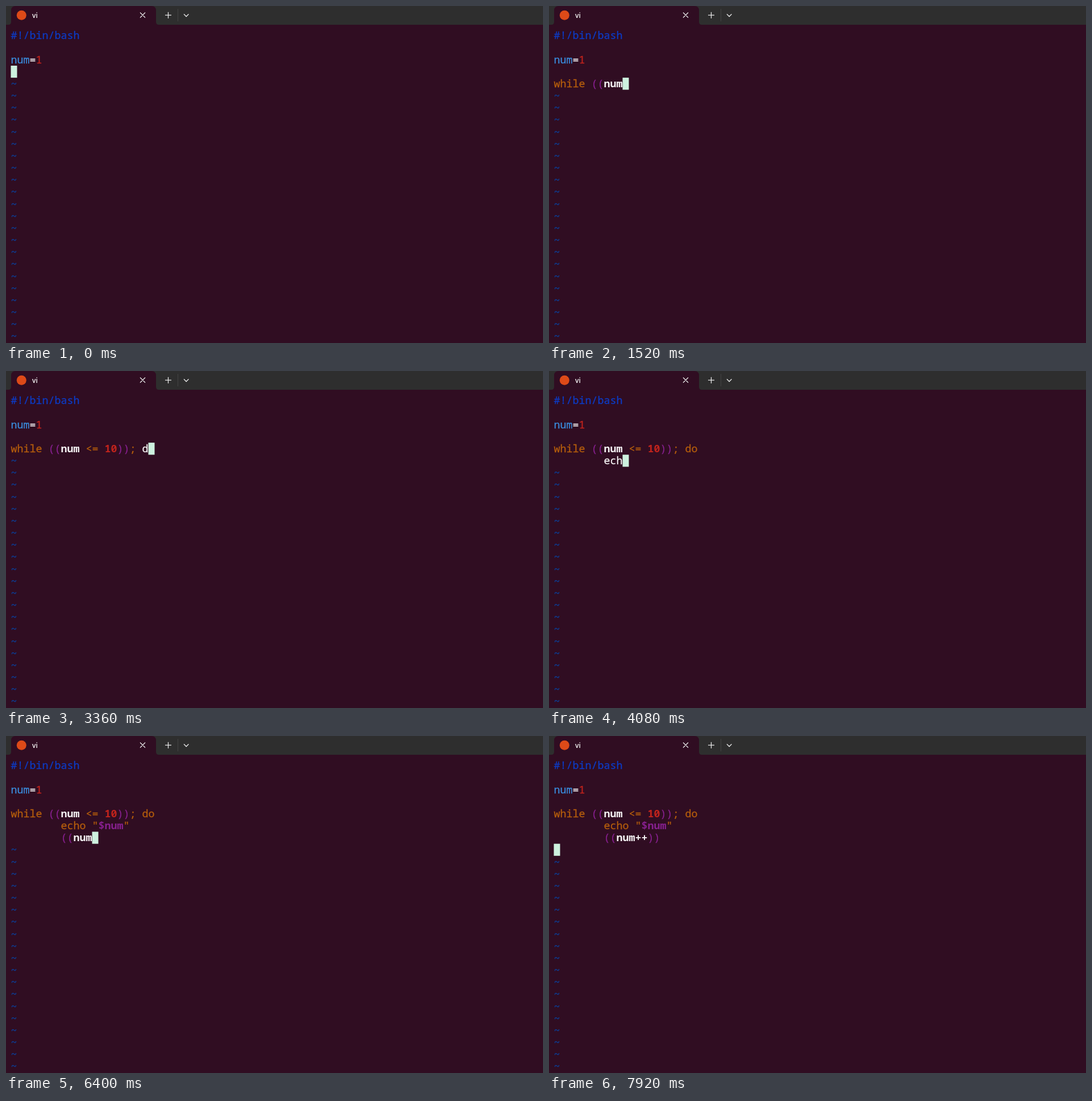
An HTML page that plays this animation: 945x593 px, repeating every 8 s.

```html
<!DOCTYPE html>
<html lang="en">
<head>
<meta charset="utf-8">
<title>Shell script in vi</title>
<style>
  html, body { margin: 0; width: 100%; height: 100%; overflow: hidden; background: #300d22; }
  svg { display: block; width: 945px; height: 593px; }
  .code text { font: 500 18.33px "Noto Sans Mono", "DejaVu Sans Mono", monospace; fill: currentColor; stroke: currentColor; stroke-width: .3px; }
  .code .strong { font-weight: 700; stroke-width: 0; }
  .tab { font: 600 12px "Open Sans", "Noto Sans", sans-serif; fill: #f4f4f4; }
  .icon { fill: none; stroke: #e8e8e8; stroke-width: 1.3; }
</style>
</head>
<body>
<svg viewBox="0 0 945 593">
  <rect width="945" height="593" fill="#300d22"/>
  <rect width="945" height="33" fill="#2e2e2e"/>
  <path d="M4 33Q9 33 9 28V8Q9 0 17 0H256Q264 0 264 8V28Q264 33 269 33Z" fill="#300d22"/>
  <circle cx="27.3" cy="16.2" r="8.5" fill="#dd4a18"/>
  <text class="tab" x="46" y="20.5">vi</text>
  <path class="icon" d="M236 11.5l9 9m0-9l-9 9M280 16.2h11m-5.5-5.5v11M313 14.3l4.2 4.2 4.2-4.2"/>
  <path d="M302.5 5V27" stroke="#444"/>
  <g class="code" id="fixed"></g>
  <g class="code" id="tildes"></g>
  <g class="code" id="typed"></g>
  <rect id="cursor" width="11" height="21.2" fill="#cdf1df"/>
</svg>
<script>
const LOOP = 8000, LEFT = 8.5, TOP = 41.5, COL = 11, ROW = 21.16, ROWS = 26;
const BLUE = '#0d3bc4', SKY = '#3a8bdb', RED = '#c0231c', ORANGE = '#b35c0c',
      PURPLE = '#86208e', WHITE = '#f4f2f3', TILDE = '#0c3f98';

// keys, time of the first one, time between them
const bursts = [
  ['\n', 160, 0], ['while ', 320, 80], ['((', 960, 160], ['num', 1280, 80],
  [' ', 1680, 0], ['<= 10', 1920, 160], ['));', 2800, 160], [' d', 3200, 80], ['o', 3440, 0],
  ['\n\t', 3680, 160], ['echo', 3920, 80], [' ', 4320, 0], ['"$', 4560, 240], ['num', 5040, 80],
  ['"\n\t((', 5440, 160], ['num', 6240, 80], ['++))', 6560, 160], ['\n', 7360, 0]
];
const keys = bursts.flatMap(([s, start, gap]) => [...s].map((key, i) => ({ key, at: start + i * gap })));

const styles = [
  [/^(while|echo|do|<=?|;|")$/, ORANGE, ''],
  [/^[()]+$/, PURPLE, ''],
  [/^\$/, PURPLE, 'strong'],
  [/^\d/, RED, 'strong'],
  [/^(num|n|nu|\++)$/, WHITE, 'strong'],
  [/./, WHITE, '']
];
const tokens = /\$\w*|\w+|[()]+|<=?|\++|\S/g;
const $ = id => document.getElementById(id);
const escapeText = s => s.replace(/&/g, '&amp;').replace(/</g, '&lt;');

function word(s, col, row, color, cls = '') {
  const x = LEFT + col * COL, y = TOP + row * ROW + 16.8;
  return `<text class="${cls}" x="${x}" y="${y.toFixed(2)}" color="${color}">${escapeText(s)}</text>`;
}

function line(s, row) {
  return [...s.matchAll(tokens)].map(m => {
    const [, color, cls] = styles.find(([re]) => re.test(m[0]));
    return word(m[0], m.index, row, color, cls);
  }).join('');
}

$('fixed').innerHTML = word('#!/bin/bash', 0, 0, BLUE) +
  word('num', 0, 2, SKY) + word('=', 3, 2, WHITE) + word('1', 4, 2, RED);

let shown = -1;
function draw(now) {
  const time = now % LOOP;
  const count = keys.filter(k => k.at <= time).length;
  if (count !== shown) {
    shown = count;
    const text = keys.slice(0, count).map(k => k.key === '\t' ? ' '.repeat(8) : k.key).join('');
    const lines = text.split('\n');
    const last = 2 + lines.length;
    $('typed').innerHTML = lines.map((s, i) => line(s, 3 + i)).join('');
    let rest = '';
    for (let r = last + 1; r < ROWS; r++) rest += word('~', 0, r, TILDE);
    $('tildes').innerHTML = rest;
    $('cursor').setAttribute('x', LEFT + lines[lines.length - 1].length * COL);
    $('cursor').setAttribute('y', TOP + last * ROW);
  }
  requestAnimationFrame(draw);
}
draw(performance.now());
</script>
</body>
</html>
```
